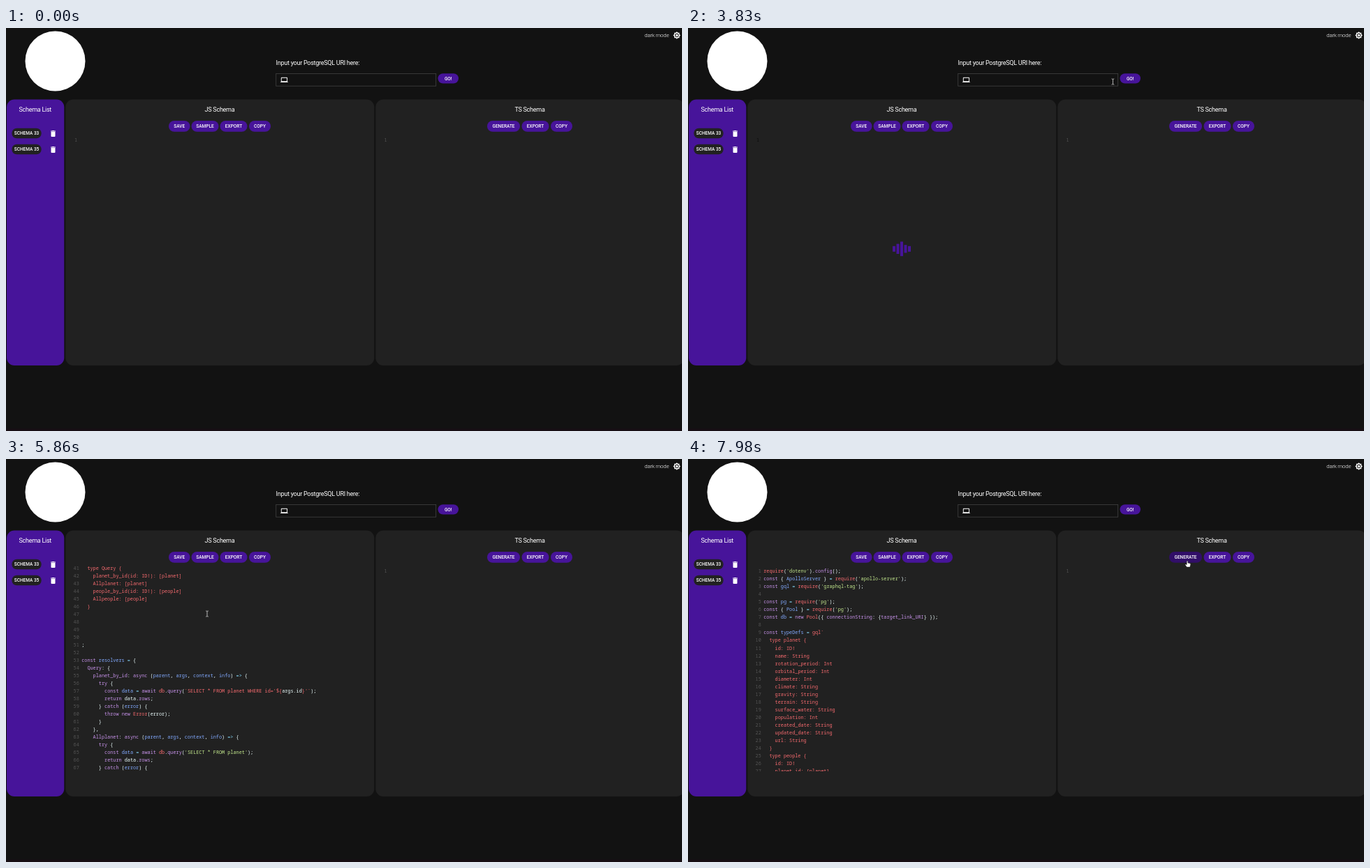
Write an HTML page that moves like this. It is 968 by 578 pixels and loops after 8000 ms.

```html
<!DOCTYPE html>
<html lang="en">
<head>
<meta charset="utf-8">
<title>Schema generator</title>
<style>
  html, body { margin: 0; width: 100%; height: 100%; overflow: hidden; background: #121212; }
  svg { display: block; width: 968px; height: 578px; }
  text { font-family: Roboto, sans-serif; fill: #fff; white-space: pre; }
  .title { font-size: 9.05px; letter-spacing: -.28px; }
  .label { font-size: 6.5px; font-weight: 500; text-anchor: middle; }
  .mid { text-anchor: middle; }
  .code text, .num { font-family: "Noto Sans Mono", "DejaVu Sans Mono", monospace; font-size: 6.84px; }
  .code .num, .num { fill: #545454; text-anchor: end; }
</style>
</head>
<body>
<svg id="stage" viewBox="0 0 968 578">
  <defs>
    <clipPath id="editorClip"><rect x="86" y="153.5" width="440" height="294.5"/></clipPath>
    <clipPath id="uriClip"><rect x="406" y="66" width="203.8" height="17"/></clipPath>
  </defs>
</svg>
<script>
const NS = 'http://www.w3.org/2000/svg';
const stage = document.getElementById('stage');
const PURPLE = '#47149a', DARK = '#212121', HOVER = '#310e68';
const LOOP = 8000, LINE = 11.02, CHAR = 4.104;

function add(parent, tag, attrs = {}, content = '') {
  const el = document.createElementNS(NS, tag);
  for (const key in attrs) el.setAttribute(key, attrs[key]);
  el.textContent = content;
  parent.appendChild(el);
  return el;
}
const text = (x, y, content, cls, more) => add(stage, 'text', { x, y, class: cls, ...more }, content);
const box = (x, y, width, height, rx, fill) => add(stage, 'rect', { x, y, width, height, rx, fill });
const icon = (x, y, scale, d) =>
  add(stage, 'path', { d, fill: '#fff', transform: `translate(${x} ${y}) scale(${scale}) translate(-12 -12)` });
function button(x, y, width, height, label, fill = PURPLE) {
  const rect = box(x, y, width, height, height / 2, fill);
  text(x + width / 2, y + height / 2 + 2.2, label, 'label');
  return rect;
}
const show = (el, on) => el.setAttribute('visibility', on ? 'visible' : 'hidden');

// Page
box(0, 574.5, 968, 3.5, 0, '#170e14');
add(stage, 'circle', { cx: 70.5, cy: 47.5, r: 43, fill: '#fff' });
text(914.3, 12.5, 'dark mode', '', { 'font-size': 8, 'font-weight': 300, 'letter-spacing': -.28 });
icon(960.6, 10.5, .46, 'M20 8.69V4h-4.69L12 .69 8.69 4H4v4.69L.69 12 4 15.31V20h4.69L12 23.31 15.31 20H20v-4.69L23.31 12zM12 18a6 6 0 1 1 0-12 6 6 0 0 1 0 12zm0-10a4 4 0 1 0 0 8 4 4 0 0 0 0-8z');

text(386.6, 53, 'Input your PostgreSQL URI here:', 'title');
const field = add(stage, 'rect', { x: 386.7, y: 65.4, width: 229, height: 17.8, fill: '#121212', 'stroke-width': .8 });
icon(398.4, 74.4, .46, 'M20 18a2 2 0 0 0 2-2V6a2 2 0 0 0-2-2H4a2 2 0 0 0-2 2v10a2 2 0 0 0 2 2H0v2h24v-2zM4 6h16v10H4z');
const uri = text(407.3, 76.6, 'postgres://kfjddwzx:D7wiKT3ecnh8hQnWMZmiC5LTY9BFxPWF', '',
  { 'font-size': 7.19, 'clip-path': 'url(#uriClip)' });
const caret = box(0, 70, .7, 9, 0, '#fff');
const go = button(618.5, 65.2, 29.5, 14.3, 'GO!');

box(1, 102.5, 82.3, 381.5, 11, PURPLE);
box(85.3, 102.5, 442, 381.5, 11, DARK);
box(529.3, 102.5, 442, 381.5, 11, DARK);
text(41.7, 120.4, 'Schema List', 'title mid');
text(306, 120.4, 'JS Schema', 'title mid');
text(750, 120.4, 'TS Schema', 'title mid');
[['SCHEMA 33', 151], ['SCHEMA 35', 174]].forEach(([name, y]) => {
  button(8.3, y - 7.3, 42.4, 14.6, name, DARK);
  icon(67.5, y + .5, .5, 'M6 19a2 2 0 0 0 2 2h8a2 2 0 0 0 2-2V7H6zM19 4h-3.5l-1-1h-5l-1 1H5v2h14z');
});
button(233, 133, 30.5, 15.8, 'SAVE');
button(265.5, 133, 39, 15.8, 'SAMPLE');
button(306.5, 133, 39, 15.8, 'EXPORT');
button(348, 133, 31, 15.8, 'COPY');
const generate = button(689, 133, 47, 15.8, 'GENERATE');
button(738.5, 133, 39, 15.8, 'EXPORT');
button(780, 133, 31, 15.8, 'COPY');
const firstNumber = text(102, 163.3, '1', 'num');
text(545.6, 163.3, '1', 'num');

// Code
const fields = (...list) => list.map(item => '    ' + item);
const resolver = (name, sql) => [
  `    ${name}: async (parent, args, context, info) => {`,
  '      try {',
  `        const data = await db.query(${sql});`,
  '        return data.rows;',
  '      } catch (error) {',
  '        throw new Error(error);',
  '      }',
  '    },'
];
const resolvers = table => [
  ...resolver(table + '_by_id', `\`SELECT * FROM ${table} WHERE id='\${args.id}'\``),
  ...resolver('All' + table, `'SELECT * FROM ${table}'`)
];
const schema = [
  '  type planet {',
  ...fields('id: ID!', 'name: String', 'rotation_period: Int', 'orbital_period: Int', 'diameter: Int',
    'climate: String', 'gravity: String', 'terrain: String', 'surface_water: String', 'population: Int',
    'created_date: String', 'updated_date: String', 'url: String'),
  '  }',
  '  type people {',
  ...fields('id: ID!', 'planet_id: [planet]', 'url: String', 'name: String', 'height: Int', 'mass: Float',
    'hair_color: String', 'skin_color: String', 'eye_color: String', 'birth_year: String',
    'gender: String', 'created_date: String', 'updated_date: String'),
  '  }',
  '',
  '  type Query {',
  ...fields('planet_by_id(id: ID!): [planet]', 'Allplanet: [planet]',
    'people_by_id(id: ID!): [people]', 'Allpeople: [people]'),
  '  }',
  '', '', '', ''
];
const lines = [
  "require('dotenv').config();",
  "const { ApolloServer } = require('apollo-server');",
  "const gql = require('graphql-tag');",
  '',
  "const pg = require('pg');",
  "const { Pool } = require('pg');",
  'const db = new Pool({ connectionString: {target_link_URI} });',
  '',
  'const typeDefs = gql`',
  ...schema,
  '`;',
  '',
  'const resolvers = {',
  '  Query: {',
  ...resolvers('planet'),
  ...resolvers('people')
];

const COLOR = { keyword: '#c792ea', def: '#82aaff', variable: '#f56a6e', string: '#c3e88d', operator: '#89ddff', plain: '#eeffff' };
const KEYWORDS = /^(const|await|return|try|catch|throw|new|async)$/;

function kindOf(token, before, after) {
  if (token[0] === '`') return 'variable';
  if (token[0] === "'") return 'string';
  if (/^=/.test(token)) return 'operator';
  if (!/^\w/.test(token)) return 'plain';
  if (KEYWORDS.test(token) || /[.{]$/.test(before) || after[0] === ':') return 'keyword';
  if (/(const (\{ )?|catch \(|async \([^)]*)$/.test(before)) return 'def';
  return /^(data|error|args)$/.test(token) ? 'plain' : 'variable';
}

function tokenize(line) {
  const tokens = [];
  for (const match of line.matchAll(/`.*`|`$|'[^']*'|\w+|=>?|[^\w`'=]+/g)) {
    const token = match[0];
    const kind = kindOf(token, line.slice(0, match.index), line.slice(match.index + token.length));
    if (token[0] === '`') {
      token.split(/(args\.id)/).forEach(part => tokens.push([part, part === 'args.id' ? 'plain' : kind]));
    } else tokens.push([token, kind]);
  }
  return tokens;
}

const editor = add(stage, 'g', { 'clip-path': 'url(#editorClip)' });
const code = add(editor, 'g', { class: 'code' });
lines.forEach((line, i) => {
  const y = 163.3 + i * LINE;
  add(code, 'text', { x: 104.8, y, class: 'num' }, i + 1);
  const body = line.trimStart();
  const row = add(code, 'text', { x: 108.2 + (line.length - body.length) * CHAR, y });
  const inSchema = i >= 9 && i < 9 + schema.length;
  const tokens = inSchema ? [[body, 'variable']] : tokenize(body);
  tokens.forEach(([part, kind]) => add(row, 'tspan', { style: 'fill:' + COLOR[kind] }, part));
});

// Loader and pointer
const loader = add(stage, 'g', { fill: PURPLE });
const bars = Array.from({ length: 5 }, (_, i) => add(loader, 'rect', { x: 293 + i * 5.5, width: 4 }));
const ripple = add(stage, 'circle', { r: 6, fill: '#c8b428', opacity: .72 });
const pointers = {
  arrow: add(stage, 'path', { d: 'M0 0V7.4L1.7 5.9 2.9 8.6 4.1 8.1 3 5.5H5.2Z', fill: '#fff', stroke: '#000', 'stroke-width': .4 }),
  hand: add(stage, 'path', { d: 'M-.8.6Q0-.4.8.6V3L4 3.8Q4.8 4.1 4.7 5.2L3.8 9H-.8L-3.2 5.6Q-2.6 4.4-.8 5.6Z', fill: '#fff', stroke: '#000', 'stroke-width': .4 }),
  beam: add(stage, 'path', { d: 'M-1.8-4H-.5L0-3.5.5-4H1.8M0-3.5V3.5M-1.8 4H-.5L0 3.5.5 4H1.8', fill: 'none', stroke: '#ddd', 'stroke-width': .8 })
};

// Timing in ms
const APPEAR = 300, FOCUS = 1300, PASTE = 1660, CLICK = 2960, LOAD = 3020, READY = 5230;
const path = [
  [300, 907, 566], [960, 441, 74], [1950, 441, 74], [2250, 545, 62], [2570, 634, 70],
  [3620, 634, 70], [3730, 624, 70], [4500, 293.3, 219], [5180, 293.3, 219], [5250, 288, 222],
  [6350, 288, 222], [6620, 292.3, 221], [6980, 292.3, 221], [7780, 717, 151], [7960, 715, 146]
];
const scroll = [[5400, 0], [5550, 149], [5950, 530], [6110, 612], [6310, 612], [6620, 35], [6670, 0]];
const smooth = u => u * u * (3 - 2 * u);

function sample(keys, t, ease) {
  const next = keys.findIndex(key => key[0] > t);
  if (next === 0) return keys[0].slice(1);
  if (next < 0) return keys[keys.length - 1].slice(1);
  const a = keys[next - 1], b = keys[next];
  const u = ease((t - a[0]) / (b[0] - a[0]));
  return a.slice(1).map((v, i) => v + (b[i + 1] - v) * u);
}
const within = (x, y, left, top, right, bottom) => x >= left && x <= right && y >= top && y <= bottom;

function draw(t) {
  const [x, y] = sample(path, t, smooth);
  const visible = t >= APPEAR;
  const loading = t >= LOAD && t < READY;
  const overField = within(x, y, 386, 65, 616, 83);
  const overGo = within(x, y, 618, 65, 648, 79.5) && visible;
  const overGenerate = within(x, y, 689, 133, 736, 149);
  const overCode = within(x, y, 97, 154, 516, 448) && !loading || within(x, y, 541, 154, 956, 448);
  const shape = overGo || overGenerate ? 'hand' : overField || overCode ? 'beam' : 'arrow';
  for (const name in pointers) {
    show(pointers[name], visible && name === shape);
    pointers[name].setAttribute('transform', `translate(${x} ${y})`);
  }
  const clicking = t >= FOCUS && t < FOCUS + 60 || t >= CLICK && t < CLICK + 60;
  show(ripple, clicking);
  ripple.setAttribute('cx', x);
  ripple.setAttribute('cy', y);

  const focused = t >= FOCUS && t < LOAD;
  const pasted = t >= PASTE && t < LOAD;
  field.setAttribute('stroke', focused ? '#5a5a5a' : '#424242');
  show(uri, pasted);
  show(caret, focused && (t - (pasted ? PASTE : FOCUS)) % 1060 < 530);
  caret.setAttribute('x', pasted ? 608.6 : 407.4);
  go.setAttribute('fill', overGo ? HOVER : PURPLE);
  generate.setAttribute('fill', overGenerate ? HOVER : PURPLE);

  show(loader, loading);
  bars.forEach((bar, i) => {
    const offset = Math.abs(((t - 4790) / 100 + 1.45 - i + 25) % 10 - 5);
    const height = 8 + 13 * smooth(Math.max(0, 1 - offset / 1.7));
    bar.setAttribute('y', 316.8 - height / 2);
    bar.setAttribute('height', height);
  });

  show(firstNumber, t < READY);
  firstNumber.style.fill = loading ? '#0c0c0c' : '';
  show(editor, t >= READY);
  code.setAttribute('transform', `translate(0 ${-sample(scroll, t, u => u)[0]})`);
}

const start = performance.now();
function tick() {
  draw((performance.now() - start) % LOOP);
  requestAnimationFrame(tick);
}
draw(0);
requestAnimationFrame(tick);
</script>
</body>
</html>
```
